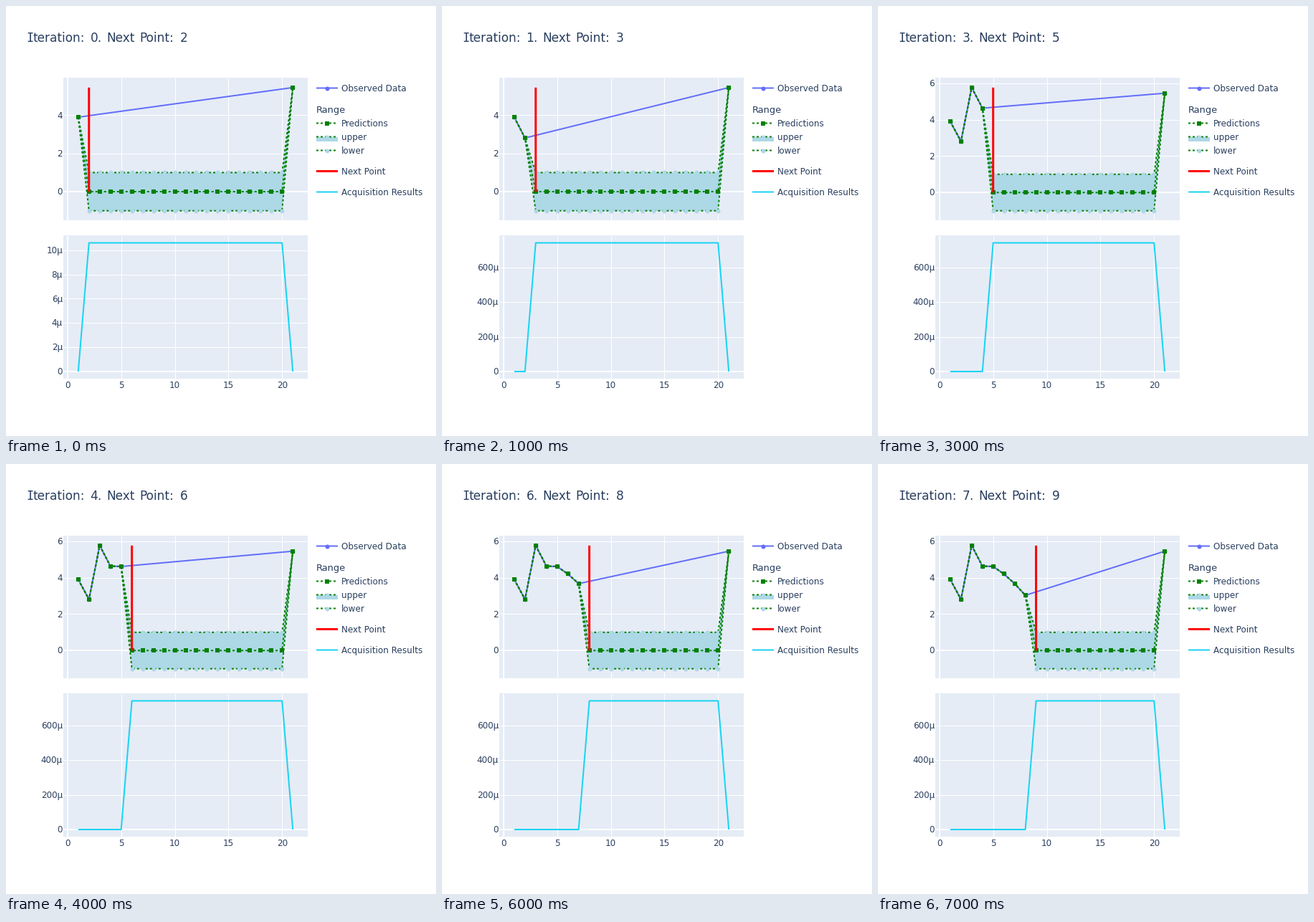
Recreate the animation shown at these times as a matplotlib script. Size 600 by 600 pixels, loop 8000 ms.

```python
import numpy as np
import matplotlib.pyplot as plt
from matplotlib.animation import FuncAnimation
from matplotlib.patches import Rectangle

SIZE, DPI = 600, 100
PX = 72 / DPI  # points per pixel

INK, PANEL, BLUE = "#2a3f5f", "#e5ecf6", "#636efa"
GREEN, BAND, RED, CYAN = "#008000", "#add8e6", "#ff0000", "#19d3f3"

LEFT, RIGHT = 80, 421
TOP_PANEL, LOW_PANEL = (100, 299.5), (320.5, 520)
DOTS = (0, (1.5, 1.5))

XS = np.arange(1, 22)
SAMPLES = [3.9, 2.81, 5.76, 4.63, 4.61, 4.2, 3.67, 3.03]
LAST = 5.45

plt.rcParams["font.family"] = "DejaVu Sans"
fig = plt.figure(figsize=(SIZE / DPI, SIZE / DPI), dpi=DPI, facecolor="white")
ax = fig.add_axes([0, 0, 1, 1])


def px_x(x):
    return 250.5 + (np.asarray(x) - 11) * 14.97


def scale_y(low, high, panel, pad):
    """Map values low..high into a panel, leaving pad pixels at both ends."""
    top, bottom = panel
    step = (bottom - top - 2 * pad) / (high - low)
    return lambda v: bottom - pad - (np.asarray(v) - low) * step


def label(x, y, text, size=12, ha="left", **kw):
    ax.text(x, y, text, fontsize=size * PX, color=INK, ha=ha, va="baseline",
            zorder=20, **kw)


def line(x, y, color, width=2, z=5, style="-", snap=False):
    ax.plot(x, y, color=color, lw=width * PX, ls=style, zorder=z, snap=snap,
            solid_capstyle="butt", dash_capstyle="butt")


def dots(x, y, color, z, shape="o"):
    ax.plot(x, y, shape, color=color, ms=6 * PX, mew=0, zorder=z)


def panel(bounds, ticks, y_map, unit=""):
    top, bottom = bounds
    ax.add_patch(Rectangle((LEFT, round(top)), RIGHT - LEFT,
                           round(bottom - 0.1) - round(top),
                           fc=PANEL, lw=0, zorder=0))
    for x in range(0, 21, 5):
        line([px_x(x)] * 2, [top, bottom], "white", 1 if x else 2, 1, snap=True)
    for t in ticks:
        y = y_map(t)
        line([LEFT, RIGHT], [y, y], "white", 1 if t else 2, 1, snap=True)
        label(79, y + 4.2, f"{t}{unit if t else ''}", ha="right")


def legend_row(y, text, color, width=2, style="-"):
    line([433, 463], [y, y], color, width, 5, style)
    label(468, y + 4.5, text)


def legend():
    legend_row(114.5, "Observed Data", BLUE)
    dots([448], [114.5], BLUE, 6)
    label(433, 149, "Range", 13)
    legend_row(163.5, "Predictions", GREEN, style=DOTS)
    dots([448], [163.5], GREEN, 6, "s")
    ax.add_patch(Rectangle((433, 182.5), 30, 6, fc=BAND, lw=0, zorder=2))
    for y, text in ((182.5, "upper"), (201.5, "lower")):
        legend_row(y, text, GREEN, style=DOTS)
        dots([448], [y], BAND, 6)
    legend_row(230.5, "Next Point", RED, 3)
    legend_row(259.5, "Acquisition Results", CYAN)


def title(step, nxt):
    label(33.6, 50, "I", 17, "center", family="DejaVu Sans Mono")
    words = ((37.2, "teration:"), (117.6, f"{step}."), (140.6, "Next"),
             (186.2, "Point:"), (242.6, f"{nxt}"))
    for x, word in words:
        label(x, 50, word, 17)


def draw(step):
    ax.clear()
    ax.set_xlim(0, SIZE)
    ax.set_ylim(SIZE, 0)
    ax.axis("off")

    nxt = step + 2
    known = (XS < nxt) | (XS == 21)
    mean = np.zeros(len(XS))
    mean[:step + 1] = SAMPLES[:step + 1]
    mean[-1] = LAST
    spread = np.where(known, 0, 1)
    peak = mean.max()
    x = px_x(XS)

    y_map = scale_y(-1, peak, TOP_PANEL, 13.8)
    panel(TOP_PANEL, range(0, int(peak + 0.5) + 1, 2), y_map)
    upper, lower, middle = (y_map(mean + k * spread) for k in (1, -1, 0))
    ax.fill_between(x, upper, lower, fc=BAND, lw=0, zorder=2)
    line(x[known], middle[known], BLUE, z=3)
    dots(x[known], middle[known], BLUE, 4)
    for edge in (upper, lower):
        line(x, edge, GREEN, z=5, style=DOTS)
        dots(x, edge, BAND, 6)
    line(x, middle, GREEN, z=7, style=DOTS)
    dots(x, middle, GREEN, 8, "s")
    line([px_x(nxt)] * 2, y_map([0, peak]), RED, 3, 9)

    gain, ticks = (10.6, range(0, 11, 2)) if step == 0 else (741, range(0, 601, 200))
    g_map = scale_y(0, gain, LOW_PANEL, 9.98)
    panel(LOW_PANEL, ticks, g_map, "\u00b5")
    line(x, g_map(gain * spread), CYAN)
    for t in range(0, 21, 5):
        label(px_x(t), 533, str(t), ha="center")

    legend()
    title(step, nxt)
    return []


anim = FuncAnimation(fig, draw, frames=8, interval=1000, init_func=lambda: [],
                     repeat=True, repeat_delay=0)
plt.show()
```
